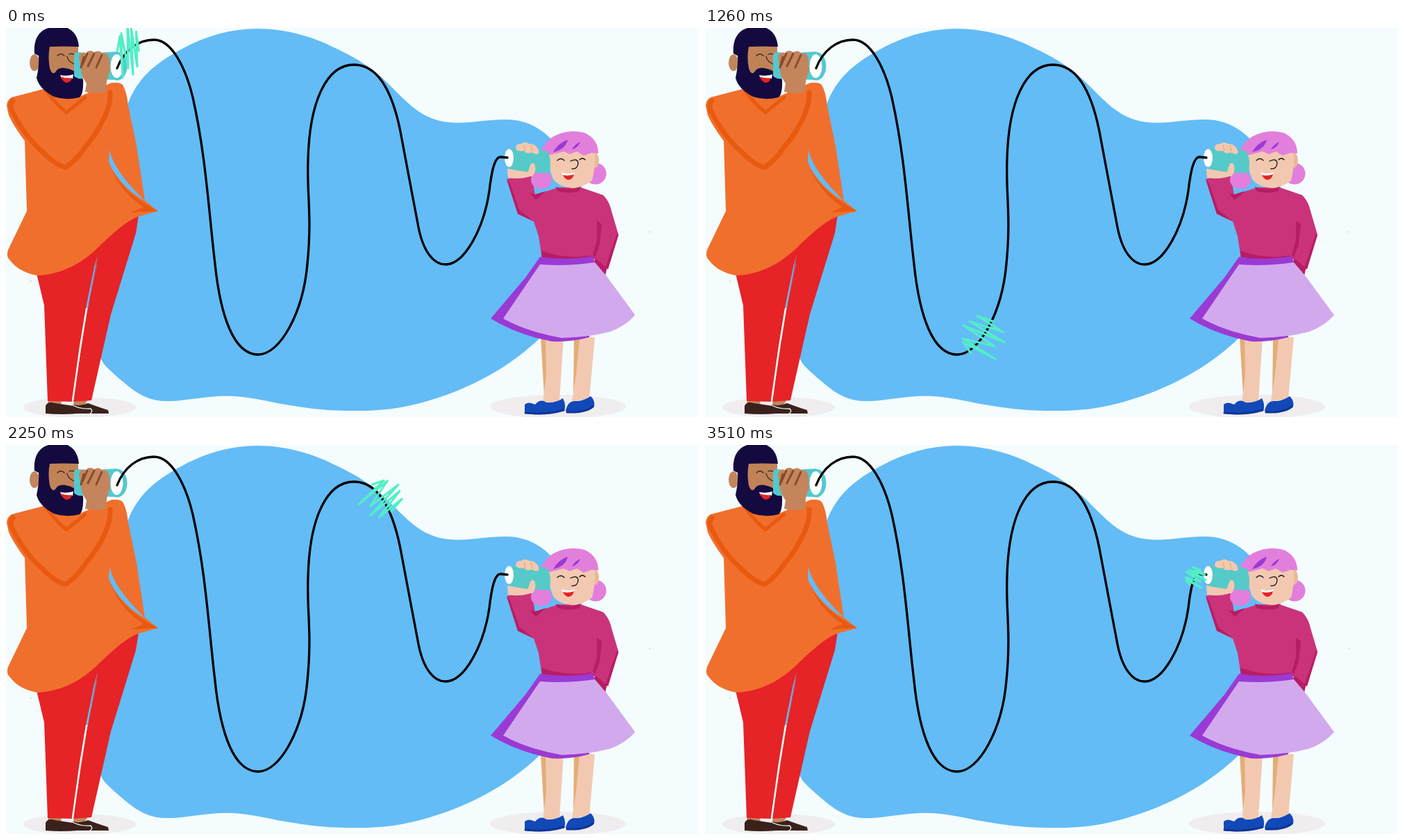
These frames come from a looping animation (998x561 px, 3.6 s). An HTML page:

```html
<!DOCTYPE html>
<html lang="en">
<head>
<meta charset="utf-8">
<title>Tin can telephone</title>
<style>
  html, body { margin: 0; height: 100%; overflow: hidden; background: #f4fcfe; }
  svg { display: block; width: 100vw; height: 100vh; }
  .line { fill: none; stroke-linecap: round; stroke-linejoin: round; }
</style>
</head>
<body>
<svg viewBox="0 0 998 561" preserveAspectRatio="none">
  <g fill="#f0edef">
    <ellipse cx="106" cy="547" rx="81" ry="15"/>
    <ellipse cx="795" cy="546" rx="98" ry="17"/>
  </g>
  <path fill="#63bcf6" d="M176 108C189 74 213 53 243 36C280 14 320 1 362 1C405 1 445 14 472 28C502 42 526 56 548 78C574 103 592 126 625 134C655 141 685 132 720 132C750 132 772 146 787 162C812 190 826 216 830 232C848 300 845 390 768 448C735 479 695 506 640 527C595 543 560 552 510 552C460 553 425 547 390 541C350 532 330 530 305 531C275 533 250 539 228 538C198 537 180 520 160 503C147 491 138 484 136 474C124 430 112 390 120 340C130 260 150 180 176 108Z"/>

  <g id="man">
    <path fill="#c4855d" d="M61 536H79L80 545H60ZM98 536H118L112 545H97Z"/>
    <path fill="#e62326" d="M44 354L100 330L132 312L131 338L118 400L96 539L60 538L55 400Z"/>
    <path fill="#e62326" d="M131 308L165 280L191 270L187 296L151 413L123 537L96 539L117 407L131 340Z"/>
    <path fill="#63bcf6" d="M132 327L117 407L115 404L127 345Z"/>
    <path class="line" stroke="#f4fcfe" stroke-width="2.5" d="M116 405L107 460L96 538"/>
    <g fill="#3a211c">
      <path d="M57 545Q60 538 70 541L97 545L103 556Q80 558 57 556Z"/>
      <path d="M95 543Q108 546 118 541Q134 547 147 551L148 556H98Z"/>
    </g>
    <path class="line" stroke="#f4fcfe" stroke-width="1.3" d="M94 543Q106 550 122 549Q126 553 121 556"/>

    <path fill="#f16f2c" d="M1 112Q2 103 8 100L58 87L108 98L152 79Q164 78 168 82Q174 92 176 112L188 170L200 249L219 264L190 272C170 280 150 300 131 318C112 336 85 355 45 357Q18 352 5 334Q0 329 3 320L30 264L27 163Q10 140 4 126Z"/>
    <path fill="#63bcf6" d="M149 175C153 198 176 226 200 249C178 239 153 210 148 192Z"/>
    <path fill="#e85a10" d="M150 200C162 224 184 246 219 264L180 266L198 258Q166 238 150 200Z"/>
    <g class="line" stroke="#e85a10">
      <path stroke-width="7" d="M10 105Q4 112 10 122Q28 158 54 180Q72 198 86 201Q102 190 113 173Q132 151 143 126Q151 108 150 93"/>
      <path stroke-width="5" d="M57 89Q70 108 87 122L114 100"/>
    </g>

    <ellipse cx="41" cy="50" rx="7" ry="12" fill="#c4855d"/>
    <path fill="#c08358" d="M56 24H104V75H56Z"/>
    <path fill="#140a3f" d="M41 37Q39 13 54 3Q70 -5 86 -1Q103 5 105 27Q82 26 63 27Q60 42 63 58Q66 68 71 64Q75 56 86 58Q99 60 104 69L111 74Q112 95 106 100Q86 105 69 99Q48 88 44 72Q48 54 47 40Z"/>
    <path fill="#fff" d="M78 68Q88 70 97 67L96 73H80Z"/>
    <path fill="#e62326" d="M79 70Q86 73 95 72Q94 78 87 79Q81 77 79 70Z"/>
    <g class="line" stroke="#3a211c" stroke-width="1.3">
      <path d="M74 40Q79 35 84 40M91 38Q96 36 99 39"/>
      <path d="M88 41Q89 48 98 52"/>
    </g>
    <path fill="#55c8ce" d="M98 38Q104 32 112 37L160 34V75L110 73Q102 74 98 69Z"/>
    <ellipse cx="160" cy="55" rx="14.5" ry="20.5" fill="#55c8ce"/>
    <ellipse cx="159.5" cy="55" rx="9" ry="17" fill="#fff"/>
    <path fill="#c4855d" d="M105 43Q107 33 115 36Q120 30 127 35Q134 31 138 36Q148 35 149 45L150 62Q144 74 144 92Q130 96 114 92L116 80Q107 67 108 58Z"/>
    <path class="line" stroke="#8a4b2d" stroke-width="3" d="M117 37L110 53M127 37L118 55M138 39L130 57M112 42L108 57"/>
    <path class="line" stroke="#55c8ce" stroke-width="3" d="M102 38Q96 53 103 70"/>
  </g>

  <g id="girl">
    <path fill="#e4ad77" d="M770 446H790L785 530L775 530ZM818 446H835L828 530L817 530Z"/>
    <path fill="#f2c9b0" d="M777 446H803L797 538L773 541L778 500ZM826 446H848L840 535L815 538L821 500Z"/>
    <g fill="#1149b8">
      <path d="M747 543Q752 538 762 543Q770 534 778 540Q792 541 802 534Q807 543 804 552Q778 560 747 556Z"/>
      <path d="M806 552Q809 538 819 538Q830 539 842 531Q849 538 847 546Q838 555 808 555Z"/>
    </g>
    <path class="line" stroke="#0d3597" stroke-width="3" d="M748 555Q780 558 803 551M808 554Q834 555 845 546"/>
    <path fill="#b81c63" d="M848 330L872 315L862 362L847 340Z"/>
    <path fill="#ca337a" d="M721 218Q740 212 757 212L762 241L795 230H828L860 241Q869 250 872 264L882 298L865 346L850 333H772L767 300L760 279L737 268Z"/>
    <g fill="#b81c63">
      <path d="M792 229Q810 236 827 228L826 235Q811 240 794 235Z"/>
      <path d="M772 333L771 321Q805 334 842 328L849 333Z"/>
      <path d="M721 218L737 268L760 279L739 262L726 224ZM754 238L762 240L778 235L763 248Z"/>
      <path d="M851 278L858 283L855 312L848 331L845 327L851 306Z"/>
      <path d="M880 296L863 346L867 348L882 299Z"/>
    </g>
    <path fill="#9a3ad4" d="M769 330Q808 336 845 329L849 341L840 446Q815 453 786 452Q735 442 698 419L748 360Z"/>
    <path fill="#d3a9ee" d="M769 341Q808 344 848 338L865 358L906 414Q892 430 870 438Q840 446 800 447Q750 438 716 419Z"/>

    <g fill="#e27fdc">
      <circle cx="849" cy="210" r="15.5"/>
      <ellipse cx="771" cy="219" rx="15" ry="13"/>
    </g>
    <ellipse cx="848" cy="191" rx="6" ry="11" fill="#e9b996"/>
    <path fill="#f2c9b0" d="M782 176H848Q849 202 844 220Q832 229 818 231Q797 230 788 218Q780 200 782 176Z"/>
    <path fill="#e27fdc" d="M769 180Q776 163 789 156Q810 145 833 151Q853 160 853 181L843 180L832 184L822 178L812 182L803 178L784 183Z"/>
    <path fill="#9a3ad4" d="M788 179Q795 166 809 161Q806 175 788 179ZM815 175Q819 168 827 164Q824 173 815 175Z"/>
    <g class="line" stroke="#111" stroke-width="1.3">
      <path d="M794 191Q799 186 804 191M826 190Q830 186 834 190"/>
      <path d="M813 192Q823 187 824 195Q823 204 815 203"/>
    </g>
    <path fill="#fff" d="M800 208Q809 212 819 208L817 214H803Z"/>
    <path fill="#e62326" d="M802 212Q810 214 818 211Q816 219 809 219Q804 217 802 212Z"/>

    <path fill="#f2c9b0" d="M722 203Q742 204 757 197L758 213Q742 219 723 216Z"/>
    <path fill="#56c9c9" d="M722 175Q745 170 780 178Q787 193 782 209Q750 209 724 203Z"/>
    <ellipse cx="724.5" cy="187.5" rx="6.5" ry="13" fill="#fff"/>
    <path fill="#f2c9b0" d="M734 174Q734 166 742 167Q748 163 753 167Q761 166 766 174Q770 182 763 182Q758 179 755 180Q749 182 746 177Q737 179 734 174ZM754 200Q757 192 761 196Q765 206 758 214L750 214Z"/>
    <path class="line" stroke="#e4ad77" stroke-width="1.2" d="M746 169L748 177M756 169L758 178"/>
  </g>

  <path id="string" class="line" stroke="#000" stroke-width="3.3" d="M160 58C170 32 190 17 213 17C238 17 258 55 269 100C288 185 292 265 301 340C309 418 329 471 363 471C395 471 428 410 434 340C441 270 433 240 435 190C437 105 462 53 501 53C541 53 560 103 570 160C579 208 585 240 593 282C600 323 616 341 633 341C660 341 688 290 696 235C700 200 705 186 712 186L722 187"/>
  <path id="voice" class="line" stroke="#52efc6" stroke-width="3" vector-effect="non-scaling-stroke" d="M0 -28L18 -22L-34 -14L22 -18L-22 0L32 -2L-30 13L28 8L-20 24L24 21L0 28"/>
  <g fill="#c9a99d"><circle cx="36" cy="365" r=".8"/><circle cx="927" cy="294" r=".8"/></g>
</svg>
<script>
const STEP = 90, STEPS = 40;
const string = document.getElementById('string');
const voice = document.getElementById('voice');
const total = string.getTotalLength();

// Waypoints of the voice: step, x, y, size across and along the string, extra tilt in degrees
const stops = [
  [0, 179, 36, 1.15, .55, 45],
  [4, 262, 72, 1.2, 1, -20],
  [6, 282, 159, 1, 1, 0],
  [10, 303, 366, 1, 1, 0],
  [12, 325, 440, 1, 1, 0],
  [17, 437, 307, 1, 1, 0],
  [18, 436, 247, 1, 1, 0],
  [24, 501, 53, .9, .9, 0],
  [25, 541, 76, .95, .85, 0],
  [30, 584, 247, .75, .85, 0],
  [32, 599, 308, .72, .85, 0],
  [36, 680, 280, .62, .65, 0],
  [39, 706, 191, .47, .47, 0]
].map(([step, x, y, across, along, tilt]) =>
  ({ step, at: nearestLength(x, y), across, along, tilt }));

function nearestLength(x, y) {
  let best = 0, least = Infinity;
  for (let at = 0; at <= total; at++) {
    const p = string.getPointAtLength(at);
    const distance = Math.hypot(p.x - x, p.y - y);
    if (distance < least) [best, least] = [at, distance];
  }
  return best;
}

function draw(now) {
  const step = Math.floor(now / STEP) % STEPS;
  const next = Math.max(1, stops.findIndex(s => s.step >= step));
  const a = stops[next - 1], b = stops[next];
  const mix = key => a[key] + (b[key] - a[key]) * (step - a.step) / (b.step - a.step);

  const at = mix('at');
  const p = string.getPointAtLength(at);
  const back = string.getPointAtLength(Math.max(0, at - 8));
  const ahead = string.getPointAtLength(Math.min(total, at + 8));
  const heading = Math.atan2(ahead.y - back.y, ahead.x - back.x) * 180 / Math.PI;
  voice.setAttribute('transform',
    `translate(${p.x} ${p.y}) rotate(${heading - 90 + mix('tilt')}) scale(${mix('across')} ${mix('along')})`);
}

const start = performance.now();
(function tick() {
  draw(performance.now() - start);
  requestAnimationFrame(tick);
})();
</script>
</body>
</html>
```
